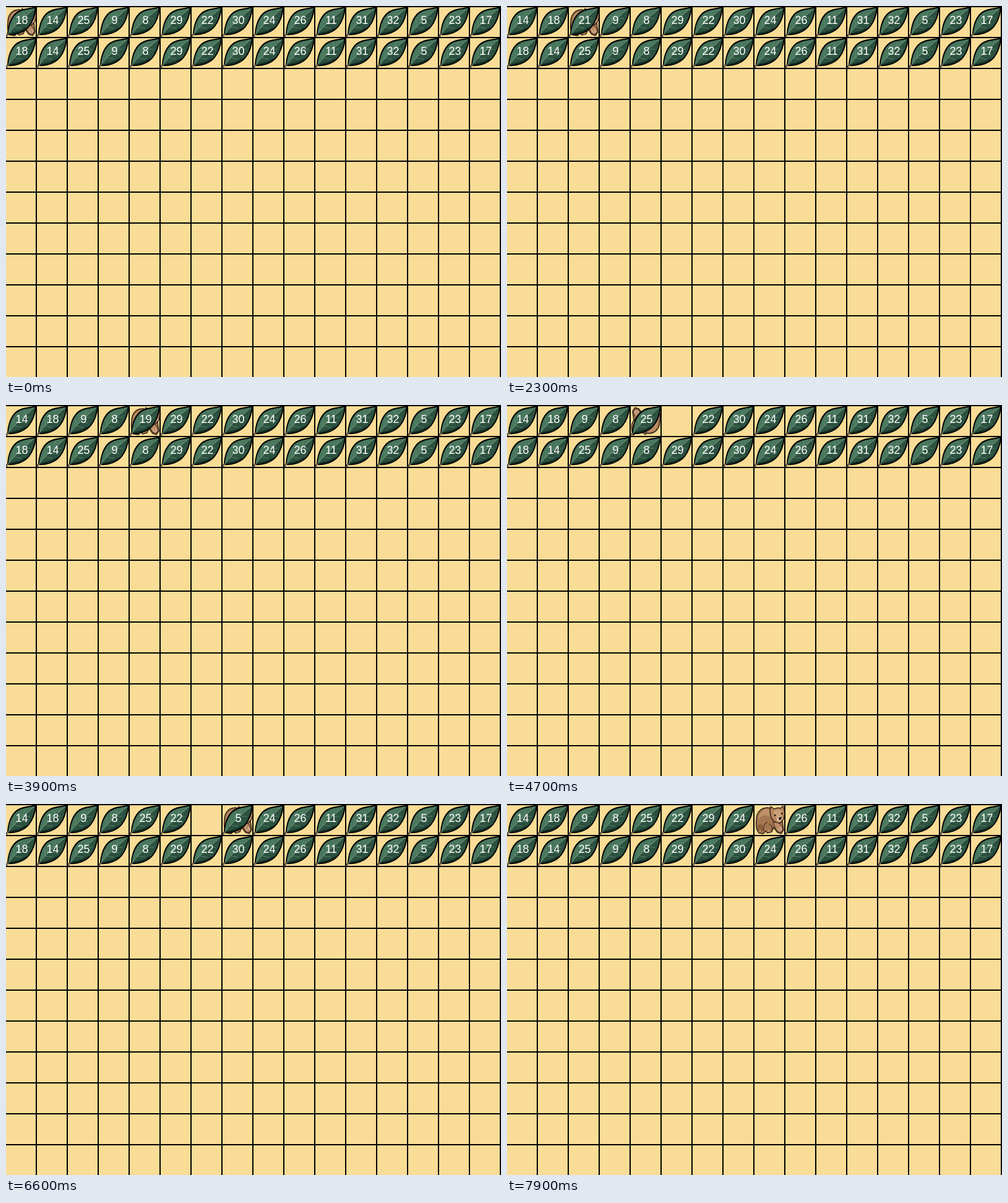
Recreate the animation shown at these times as an HTML page with a canvas. Size 800 by 600 pixels, loop 8 s.

```html
<!DOCTYPE html>
<html lang="en">
<head>
<meta charset="utf-8">
<title>Wombat bubble sort</title>
<style>
  html, body { margin: 0; height: 100%; overflow: hidden; background: #f9dc96; }
  canvas { display: block; }
</style>
</head>
<body>
<canvas id="stage" width="800" height="600"></canvas>
<script>
const ctx = document.getElementById('stage').getContext('2d');
const CELL = 50, LOOP = 8000, TICK = 100;
const START = [18, 14, 25, 9, 8, 29, 22, 30, 24, 26, 11, 31, 32, 5, 23, 17];

// Pace of the sort: [time in ms, actions done]
const PACE = [[0, 0], [600, 0], [1300, 48], [2300, 152], [3300, 247],
  [4700, 377], [6600, 567], [6900, 604], [7900, 714], [8000, 714]];

// Every action moves the wombat one cell, or picks up or drops one leaf.
function recordSort() {
  const piles = [...START], states = [];
  let at = 0, left = false;
  const save = () => states.push({ piles: [...piles], at, left });
  const move = step => { at += step; left = step < 0; save(); };
  const pickUp = () => { while (piles[at]) { piles[at]--; save(); } };
  const drop = count => { while (piles[at] < count) { piles[at]++; save(); } };
  save();
  for (let i = 0; i < 8; i++) {
    const pair = [piles[i], piles[i + 1]];
    pickUp();
    move(1);
    pickUp();
    move(-1);
    drop(Math.min(...pair));
    move(1);
    drop(Math.max(...pair));
  }
  return states;
}
const states = recordSort();

function actionsAt(time) {
  const i = PACE.findIndex(([t]) => t > time);
  const [t0, a0] = PACE[i - 1], [t1, a1] = PACE[i];
  return Math.floor(a0 + (a1 - a0) * (time - t0) / (t1 - t0) + 1e-6);
}

function shape(d, fill, stroke, width = 1) {
  const path = new Path2D(d);
  if (fill) { ctx.fillStyle = fill; ctx.fill(path); }
  if (stroke) { ctx.strokeStyle = stroke; ctx.lineWidth = width; ctx.stroke(path); }
}

function inCell(col, row, draw) {
  ctx.save();
  ctx.translate(col * CELL, row * CELL);
  draw();
  ctx.restore();
}

function drawGrid() {
  ctx.fillStyle = '#f9dc96';
  ctx.fillRect(0, 0, 800, 600);
  ctx.fillStyle = '#000';
  for (let x = 48; x < 800; x += CELL) ctx.fillRect(x, 0, 2, 600);
  for (let y = 0; y < 600; y += CELL) ctx.fillRect(0, y, 800, 2);
}

function drawLeaf(count) {
  shape('M0 50L4 44', null, '#000', 2.5);
  shape('M3 46C3 37 6 23 14 14C22 5 34 5 48 2.5C47 13 44 24 37 33C29 43 15 47 3 46Z', '#2c5140', '#000', 2);
  shape('M4 44C4 36 8 23 15 15C23 7 35 6 46 4C34 15 18 28 4 44Z', '#48765d');
  shape('M5 45C14 46 27 43 35 34L29 36C21 42 13 41 5 45Z', '#122b20');
  shape('M1 49C10 34 28 20 46 4', null, '#7da184');
  shape('M13 34L13 23M20 27L20 15M28 20L30 10M13 34L25 36M20 27L33 29M29 20L39 20', null, '#638b70', .8);
  shape('M0 50L4 45', null, '#d8b596', 1);
  ctx.font = '18px "Liberation Sans", Arial, sans-serif';
  ctx.textAlign = 'center';
  ctx.fillStyle = '#fff';
  ctx.fillText(count, 25.5, 29);
}

function drawWombat(left) {
  ctx.translate(25, 26);
  if (left) ctx.rotate(Math.PI);
  ctx.translate(-25, -26);
  shape('M6 45C2 40 2 33 3 26C3 15 9 7 19 6C25 5 30 8 35 13L45 27L47 42L43 48L37 46L31 38L28 45L21 47L18 44L14 48L7 47Z', '#a47750', '#21150e', 1.3);
  shape('M6 26C6 15 12 9 20 8C27 9 30 16 28 24C20 16 11 17 6 26Z', '#bd9068');
  shape('M5 34C11 30 15 35 15 44L8 45C5 42 4 38 5 34Z', '#8b603f');
  shape('M15 44C14 36 16 31 21 29M28 45C30 37 27 33 23 32', null, '#493022', 1.2);
  shape('M25 11L26 4L32 8C36 6 40 6 42 7L46 3L48 9C49 16 49 22 46 26L41 31L35 30C28 27 25 19 25 11Z', '#b3845c', '#21150e', 1.2);
  shape('M31 11C36 8 42 9 46 13L44 20L38 24C33 22 30 16 31 11Z', '#c99f78');
  shape('M36 22L43 20L46 24L41 29L36 27Z', '#ddb799');
  shape('M32 17h2.5v2.5h-2.5ZM43 14h2.5v2.5h-2.5ZM39 22l5-1l-1 4l-3 1Z', '#130d0a');
  shape('M30 29C32 36 34 40 38 45L43 46L46 41C45 35 41 31 36 30Z', '#b98a65', '#382419', 1);
  shape('M37 39L41 44M41 37L44 43M9 45L9 42M22 45L23 42', null, '#e0bca0', 1.2);
}

function render(time) {
  const { piles, at, left } = states[actionsAt(Math.floor(time / TICK) * TICK)];
  drawGrid();
  inCell(at, 0, () => drawWombat(left));
  [piles, START].forEach((row, y) => row.forEach((count, x) => {
    if (count) inCell(x, y, () => drawLeaf(count));
  }));
}

const began = performance.now();
function loop() {
  render((performance.now() - began) % LOOP);
  requestAnimationFrame(loop);
}
loop();
</script>
</body>
</html>
```
